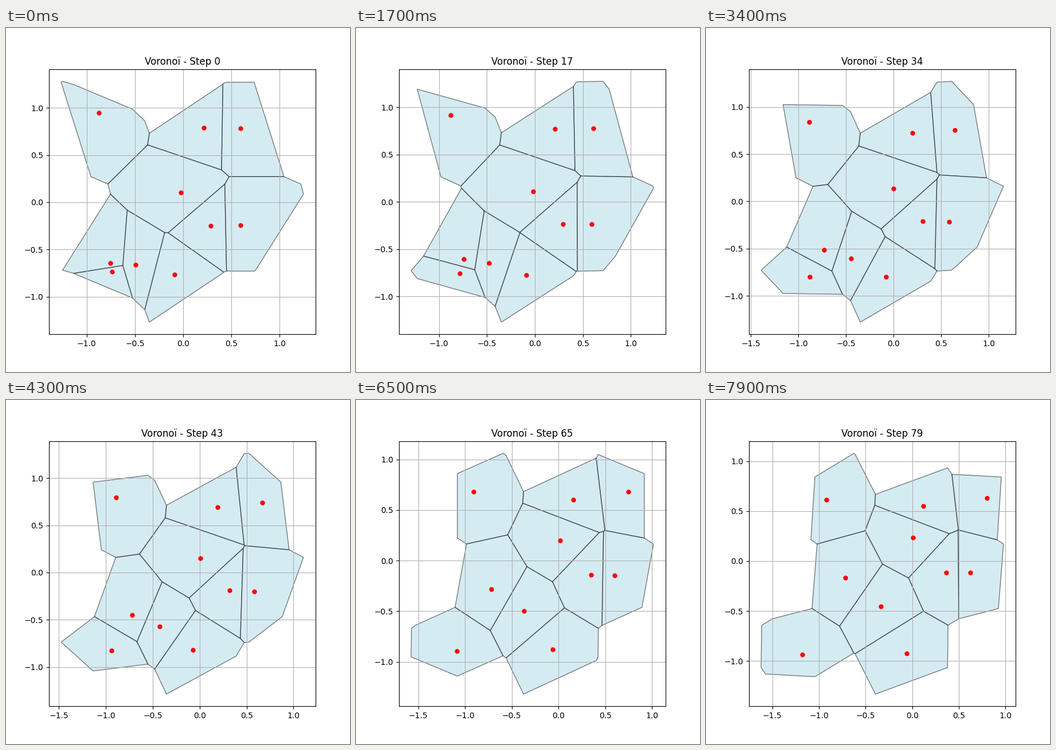
These frames come from a looping animation (600 px wide and 600 px high, 8 s). A matplotlib script:

```python
import numpy as np
import matplotlib.pyplot as plt
from matplotlib.animation import FuncAnimation

STEPS = 80
PERIOD = 2.0
STIFFNESS = 0.001  # pull per step towards equal cell areas
WARMUP = 2         # steps of acceleration before the first picture

START = np.array([
    (-0.874, 0.948), (0.214, 0.790), (0.595, 0.784), (-0.024, 0.103),
    (0.285, -0.249), (0.595, -0.243), (-0.754, -0.644), (-0.739, -0.736),
    (-0.493, -0.664), (-0.089, -0.766),
])
SHIFTS = [(PERIOD * i, PERIOD * j) for i in (-1, 0, 1) for j in (-1, 0, 1)]


def clip(poly, nx, ny, c, tag):
    """Keep nx*x + ny*y <= c. A vertex carries the tag of the edge ending there."""
    out = []
    dist = [nx * x + ny * y - c for x, y, _ in poly]
    for i, (x1, y1, edge) in enumerate(poly):
        x0, y0, _ = poly[i - 1]
        d0, d1 = dist[i - 1], dist[i]
        if (d0 <= 0) != (d1 <= 0):
            t = d0 / (d0 - d1)
            out.append((x0 + t * (x1 - x0), y0 + t * (y1 - y0),
                        edge if d1 > 0 else tag))
        if d1 <= 0:
            out.append((x1, y1, edge))
    return out


def voronoi(seeds):
    """Unwrapped Voronoi cells on a torus, and all copies of the seeds."""
    images = np.concatenate([seeds + s for s in SHIFTS])
    cells = []
    for px, py in seeds:
        order = np.argsort(np.hypot(images[:, 0] - px, images[:, 1] - py))
        poly = [(px + dx, py + dy, -1)
                for dx, dy in ((-2, -2), (2, -2), (2, 2), (-2, 2))]
        for k in order[1:]:
            qx, qy = images[k]
            c = (qx * qx + qy * qy - px * px - py * py) / 2
            poly = clip(poly, qx - px, qy - py, c, k)
        cells.append(poly)
    return cells, images


def area(poly):
    return sum(poly[i - 1][0] * p[1] - p[0] * poly[i - 1][1]
               for i, p in enumerate(poly)) / 2


def acceleration(seeds, cells, images):
    """Downhill gradient of the sum of squared cell areas."""
    areas = [area(poly) for poly in cells]
    acc = np.zeros_like(seeds)
    for j, poly in enumerate(cells):
        for i, (x, y, tag) in enumerate(poly):
            a, b = np.array(poly[i - 1][:2]), np.array((x, y))
            ratio = np.hypot(*(b - a)) / np.hypot(*(images[tag] - seeds[j]))
            excess = areas[tag % len(seeds)] - areas[j]
            acc[j] += excess * ratio * ((a + b) / 2 - seeds[j])
    return STIFFNESS * acc


def simulate():
    states = []
    seeds, speed = START.copy(), None
    for _ in range(STEPS):
        cells, images = voronoi(seeds)
        states.append((seeds, cells))
        acc = acceleration(seeds, cells, images)
        speed = (WARMUP + 1) * acc if speed is None else speed + acc
        seeds = seeds + speed
    return states


states = simulate()
fig, ax = plt.subplots(figsize=(6, 6), dpi=100)


def draw(step):
    ax.clear()
    seeds, cells = states[step]
    for poly in cells:
        xs, ys, _ = zip(*poly)
        ax.fill(xs, ys, facecolor="lightblue", edgecolor="black", alpha=0.5)
    ax.plot(seeds[:, 0], seeds[:, 1], "ro", markersize=5)
    ax.set_title(f"Voronoï - Step {step}")
    ax.grid(True)


anim = FuncAnimation(fig, draw, frames=STEPS, interval=100, repeat=True,
                     repeat_delay=0)
plt.show()
```
